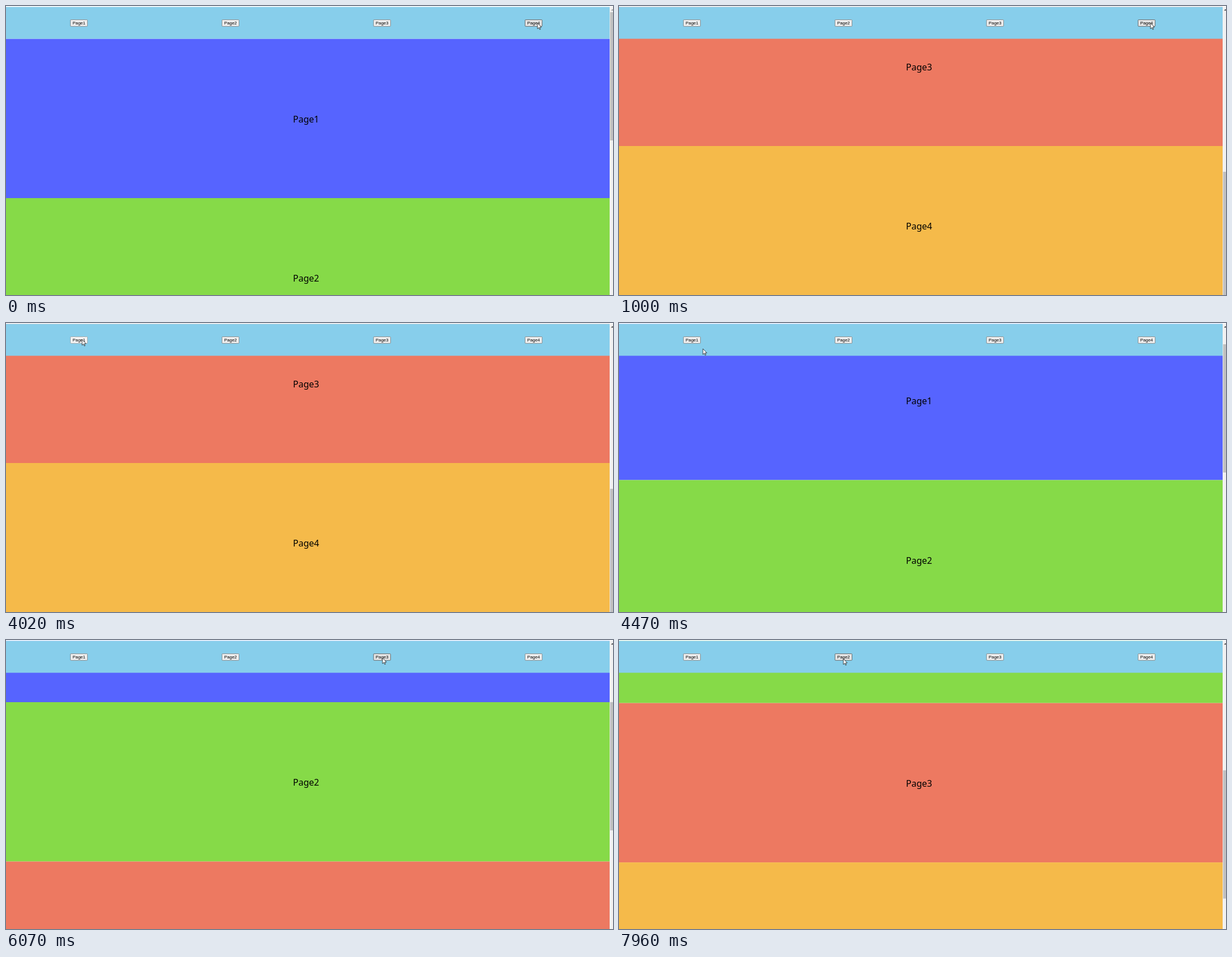
An HTML page that plays this animation: 1085x516 px, repeating every 8 s.

```html
<!DOCTYPE html>
<html lang="en">
<head>
<meta charset="utf-8">
<title>Smooth scroll pages</title>
<style>
  html, body { margin: 0; width: 100%; height: 100%; overflow: hidden; background: #fff; }
  svg { display: block; width: 1085px; height: 516px; }
  text { text-anchor: middle; fill: #000; }
  .page text { font: 16px "Noto Sans", "Open Sans", sans-serif; }
  .btn text { font: 7.9px "Liberation Sans", Arial, sans-serif; }
  .btn rect { fill: #efefef; stroke: #767676; stroke-width: .8; }
  .btn.hover rect { fill: #e5e5e5; stroke: #4f4f4f; }
  .btn.down rect { fill: #f5f5f5; stroke: #9a9a9a; }
</style>
</head>
<body>
<svg viewBox="0 0 1085 516">
  <g id="pages"></g>
  <rect width="1079" height="1.4" fill="#fff"/>
  <rect y="1.4" width="1079" height="57.1" fill="#87ceeb"/>
  <g id="buttons"></g>
  <rect x="1079" width="6" height="516" fill="#f1f1f1"/>
  <rect width="1085" height="1.4" fill="#fff"/>
  <path id="arrow" d="M1081.3 8.2 L1083.9 5.4 L1086.5 8.2 Z"/>
  <rect id="thumb" x="1079.8" y="11" width="8" height="229" fill="#c1c1c1"/>
  <path id="cursor" d="M0 0V10.2L2.4 8L4 11.6L5.4 11L3.9 7.4H7.1Z"
        fill="#fff" stroke="#000" stroke-width=".7" stroke-linejoin="round"/>
</svg>
<script>
const LOOP = 8000, PAGE_H = 284.5, TOP = 58.5;
const COLORS = ['#5664ff', '#86da48', '#ed7961', '#f5ba4a'];
const $ = id => document.getElementById(id);

function add(parent, tag, attrs, label) {
  const el = document.createElementNS('http://www.w3.org/2000/svg', tag);
  for (const k in attrs) el.setAttribute(k, attrs[k]);
  if (label) el.textContent = label;
  return parent.appendChild(el);
}

const buttons = COLORS.map((fill, i) => {
  const y = TOP + i * PAGE_H, x = 130.4 + i * 270.9, name = 'Page' + (i + 1);
  const page = add($('pages'), 'g', { class: 'page' });
  add(page, 'rect', { y, width: 1079, height: PAGE_H, fill });
  add(page, 'text', { x: 536.4, y: y + 149.4 }, name);
  const el = add($('buttons'), 'g', { class: 'btn' });
  add(el, 'rect', { x: x - 15.2, y: 24.6, width: 30.4, height: 11.7, rx: 1 });
  add(el, 'text', { x, y: 33.2 }, name);
  return { el, x };
});

// The screen refreshes in steps: start, end, number of refreshes
const RUNS = [
  [610, 1000, 4], [1680, 2700, 8], [2850, 3870, 9], [4020, 4470, 4], [4590, 5020, 4],
  [5140, 6070, 8], [6190, 6760, 5], [6910, 7150, 3], [7300, 7960, 6]
];

// Smooth scrolls: start, duration, from, to
const SCROLLS = [
  [480, 500, 0, 662], [4021.4, 560, 662, 0], [5804.6, 370, 0, 284.5],
  [6425.7, 370, 284.5, 569], [7853.7, 370, 569, 284.5]
];

// Pointer path: time, x, y
const PATH = [
  [0, 950, 30.5], [1550, 950, 30.5], [1700, 940, 48], [1980, 850, 95], [2120, 765, 104],
  [2410, 460, 70], [2700, 211, 20], [2980, 168, 36], [3150, 146, 38], [3500, 128, 33],
  [3870, 135, 30], [4020, 136, 29.5], [4170, 136, 29.5], [4320, 139, 34], [4470, 150, 46],
  [4740, 205, 72], [5140, 305, 66], [5600, 400, 33], [5810, 402, 33], [5940, 530, 40],
  [6070, 673, 32], [6470, 673, 32], [6610, 671, 62], [6760, 666.7, 108.5],
  [7150, 610, 112], [7500, 480, 78], [7830, 401, 35], [7960, 401, 33.5]
];

function shownTime(t) {
  let shown = 0;
  for (const [a, b, n] of RUNS) {
    if (t < a) break;
    const step = (b - a) / (n - 1);
    shown = a + step * Math.min(n - 1, Math.floor((t - a) / step + 1e-6));
  }
  return shown;
}

function scrollAt(t) {
  let y = 0;
  for (const [start, dur, from, to] of SCROLLS) {
    if (t < start) break;
    const p = Math.min(1, (t - start) / dur);
    y = from + (to - from) * (1 - Math.cos(Math.PI * p)) / 2;
  }
  return y;
}

function pointerAt(t) {
  const i = PATH.findIndex(k => k[0] > t);
  if (i < 0) return PATH[PATH.length - 1].slice(1);
  const [t0, x0, y0] = PATH[i - 1], [t1, x1, y1] = PATH[i];
  const p = (t - t0) / (t1 - t0);
  return [x0 + (x1 - x0) * p, y0 + (y1 - y0) * p];
}

function draw(time) {
  const t = shownTime(time % LOOP);
  const scroll = scrollAt(t), [x, y] = pointerAt(t);
  $('pages').setAttribute('transform', `translate(0 ${-scroll})`);
  $('thumb').setAttribute('y', 11 + scroll * 0.4305);
  $('arrow').setAttribute('fill', scroll > 0 ? '#505050' : '#a3a3a3');
  $('cursor').setAttribute('transform', `translate(${x} ${y})`);
  const down = t > 3950 && t < 4180;
  for (const b of buttons) {
    const over = Math.abs(x - b.x) < 15.5 && y > 24 && y < 36.6;
    b.el.setAttribute('class', 'btn' + (over ? (down ? ' down' : ' hover') : ''));
  }
}

const begin = performance.now();
function tick() {
  draw(performance.now() - begin);
  requestAnimationFrame(tick);
}
tick();
</script>
</body>
</html>
```
